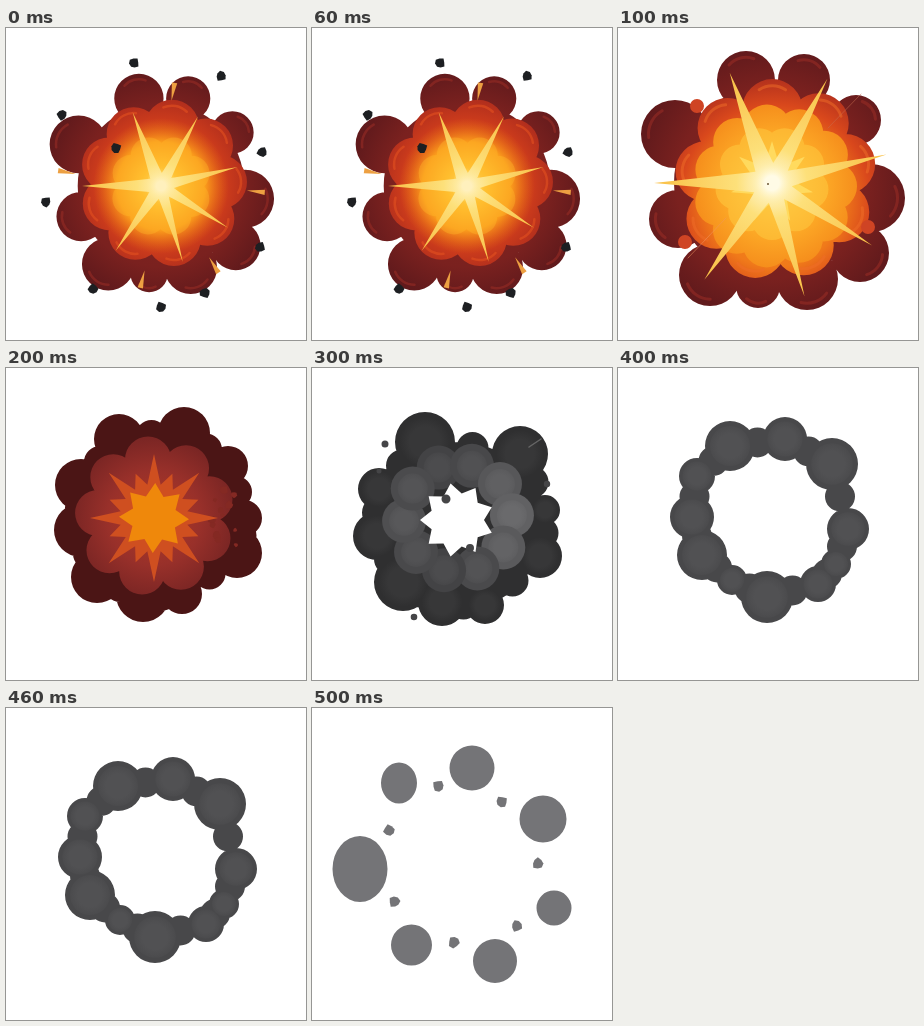
Animation, 300 px wide and 312 px high, one loop 600 ms. Source, as an HTML page with a canvas:

```html
<!DOCTYPE html>
<html lang="en">
<head>
<meta charset="utf-8">
<title>Explosion</title>
<style>
html, body { margin: 0; width: 100%; height: 100%; overflow: hidden; background: #fff; }
canvas { display: block; }
</style>
</head>
<body>
<canvas id="stage" width="300" height="312"></canvas>
<script>
const ctx = document.getElementById('stage').getContext('2d');
const STEP = 100;
const RAD = Math.PI / 180;

const polar = (cx, cy, deg, d) => [cx + d * Math.cos(deg * RAD), cy + d * Math.sin(deg * RAD)];

// Evenly spaced values of an angle, in degrees.
const turns = (n, start) => Array.from({ length: n }, (_, i) => start + i * 360 / n);

// A wreath of n circles around a centre, each as [x, y, r].
const wreath = (cx, cy, n, dist, r, start) => turns(n, start).map(a => [...polar(cx, cy, a, dist), r]);

// Circles halfway between neighbours, pulled towards a centre by a share.
const between = (list, r, pull = 0, cx = 0, cy = 0) => list.map(([x, y], i) => {
  const [u, v] = list[(i + 1) % list.length];
  const mx = (x + u) / 2, my = (y + v) / 2;
  return [mx + (cx - mx) * pull, my + (cy - my) * pull, r];
});

function glow(x, y, r, ...stops) {
  const g = ctx.createRadialGradient(x, y, 0, x, y, r);
  stops.forEach(([at, color]) => g.addColorStop(at, color));
  return g;
}

// Union of round shapes; the vertical radius is optional.
function blobs(fill, list) {
  ctx.beginPath();
  for (const [x, y, rx, ry = rx] of list) {
    ctx.moveTo(x + rx, y);
    ctx.ellipse(x, y, rx, ry, 0, 0, 7);
  }
  ctx.fillStyle = fill;
  ctx.fill();
}

// Each circle shaded by itself, lighter in the middle.
function puffs(light, dark, list) {
  for (const [x, y, r] of list) {
    blobs(glow(x, y, r, [0, light], [0.6, light], [1, dark]), [[x, y, r]]);
  }
}

// Crescent highlights on the side away from the centre.
function rims(color, width, cx, cy, list) {
  ctx.strokeStyle = color;
  ctx.lineWidth = width;
  ctx.lineCap = 'round';
  for (const [x, y, r] of list) {
    const a = Math.atan2(y - cy, x - cx);
    ctx.beginPath();
    ctx.arc(x, y, r * 0.78, a - 0.6, a + 0.6);
    ctx.stroke();
  }
}

function poly(fill, pts) {
  ctx.beginPath();
  pts.forEach(p => ctx.lineTo(...p));
  ctx.closePath();
  ctx.fillStyle = fill;
  ctx.fill();
}

// Star with rays at the given angles; the valleys lie halfway at distance r.
function star(fill, cx, cy, r, angles, reach) {
  poly(fill, angles.flatMap((a, i) => {
    const next = angles[i + 1] ?? angles[0] + 360;
    return [polar(cx, cy, a, reach(i)), polar(cx, cy, (a + next) / 2, r)];
  }));
}

// Small irregular lumps.
function stones(fill, list) {
  for (const [x, y, r] of list) {
    poly(fill, turns(8, x).map((a, k) => polar(x, y, a, r * (1 + 0.15 * Math.sin(k * 2.7 + y)))));
  }
}

// Thin radial wedge.
function spark(fill, cx, cy, deg, from, to) {
  poly(fill, [polar(cx, cy, deg, from), polar(cx, cy, deg - 1, to), polar(cx, cy, deg + 2, to)]);
}

function line(color, width, x1, y1, x2, y2) {
  ctx.strokeStyle = color;
  ctx.lineWidth = width;
  ctx.beginPath();
  ctx.moveTo(x1, y1);
  ctx.lineTo(x2, y2);
  ctx.stroke();
}

// The fireball's cloud around its centre, and the rays of its flash.
const CLOUD = [
  [-26, -103, 29], [32, -103, 26], [84, -63, 25], [99, 15, 34], [88, 70, 29],
  [35, 96, 31], [-14, 103, 22], [-62, 92, 31], [-94, 36, 29], [-97, -49, 34]];
const RAYS = [-180, -111, -62, -14, 32, 74, 125];

function cloud(cx, cy, size) {
  const lobes = CLOUD.map(([x, y, r]) => [cx + x * size, cy + y * size, r * size]);
  blobs(glow(cx, cy, 136 * size, [0, '#84251f'], [0.7, '#7a211f'], [1, '#611a1c']),
    [...lobes, [cx, cy, 98 * size]]);
  rims('rgba(150,44,36,.6)', 3 * size, cx, cy, lobes);
}

function flash(cx, cy, r, reach, core) {
  star(glow(cx, cy, reach, [0, core], [0.3, '#fde07a'], [1, '#f9bf45']), cx, cy, r, RAYS, () => reach);
  blobs(glow(cx, cy, r * 1.2, [0, core], [0.3, core], [1, 'rgba(255,232,140,0)']), [[cx, cy, r * 1.2]]);
}

function ignite() {
  const cx = 155, cy = 158;
  cloud(cx, cy, 0.85);
  const flames = wreath(157, 155, 9, 57, 27, -81);
  blobs(glow(cx, cy, 90, [0, '#f58a18'], [0.5, '#e2601b'], [0.75, '#c93a1c'], [1, '#ad2c1d']),
    [...flames, [cx, cy, 60]]);
  rims('rgba(226,80,32,.6)', 2.5, cx, cy, flames);
  blobs(glow(cx, cy, 68, [0, '#ffe37a'], [0.3, '#ffc030'], [0.65, '#fa9c1c'], [1, 'rgba(226,85,20,0)']),
    [[cx, cy, 68]]);
  blobs('rgba(255,186,45,.35)', wreath(cx, cy, 8, 33, 18, -67));
  flash(cx, cy, 13, 79, '#fff0bd');
  for (const a of [-83, 3, 56, 101, 188]) spark('#eda042', cx, cy, a, 86, 104);
  stones('#1d1f22', [
    [128, 35], [215, 48], [256, 124], [254, 219], [199, 265],
    [155, 279], [87, 261], [40, 174], [56, 87], [110, 120]].map(p => [...p, 5]));
}

function blast() {
  const cx = 154, cy = 155;
  cloud(cx, cy, 1);
  const flames = wreath(158, 152, 9, 71, 30, -93);
  blobs(glow(157, 172, 122, [0, '#f78c18'], [0.55, '#f07a1a'], [0.78, '#d9481c'], [1, '#b2301d']),
    [...flames, [cx, cy, 74]]);
  rims('rgba(240,110,40,.5)', 3, cx, cy, flames);
  blobs(glow(157, 158, 88, [0, '#ffd24a'], [0.6, '#fca625'], [1, '#f4891a']),
    [...wreath(157, 158, 11, 58, 24, -98), [157, 158, 58]]);
  blobs('rgba(255,205,66,.5)', [...wreath(cx, cy, 9, 37, 20, -70), [cx, cy, 36]]);
  line('rgba(200,110,80,.5)', 1, 243, 66, 210, 100);
  line('rgba(240,150,100,.5)', 1, 108, 190, 70, 230);
  star('rgba(255,222,100,.85)', cx, cy, 18, turns(7, -90), () => 42);
  flash(cx, cy, 20, 118, '#fffbe6');
  blobs('#cf4424', [[79, 78, 7], [67, 214, 7], [250, 199, 7]]);
  blobs('#6b5635', [[150, 156, 1]]);
}

function embers() {
  const lobes = [
    [113, 71, 25], [178, 65, 26], [222, 98, 20], [238, 150, 18], [231, 185, 25],
    [176, 226, 20], [137, 227, 27], [91, 209, 26], [75, 162, 27], [75, 117, 26]];
  blobs('#4b1515', [...lobes, ...between(lobes, 16), [150, 150, 76]]);
  blobs(glow(148, 150, 86, [0, '#b23a25'], [0.55, '#98302a'], [1, '#762423']),
    [...wreath(149, 148, 9, 57, 23, -97), [148, 150, 58]]);
  // Torn right edge
  stones('#842923', turns(12, 0).map((a, i) => [218 + 12 * Math.sin(i * i), 122 + i * 5, 4 - i % 3]));
  star('#cf4f20', 148, 150, 34, turns(16, 180), i => i % 2 ? 48 : 64);
  star('#ef880b', 148, 150, 23, turns(8, 182), () => 35);
}

function smoke() {
  const lobes = [
    [113, 74, 30], [208, 86, 28], [233, 142, 15], [228, 188, 22],
    [173, 237, 19], [130, 234, 24], [91, 214, 29], [65, 168, 24], [67, 121, 21]];
  blobs('#2f2f30', [...lobes, ...between(lobes, 16), [147, 158, 84]]);
  puffs('#373738', '#2f2f30', lobes.map(([x, y, r]) => [x, y, r * 0.85]));
  // The inner wreath is palest at the sides, most of all on the right.
  const gray = (a, shift) => {
    const c = Math.cos(a * RAD), v = Math.round(68 + shift + 20 * c * c + 9 * c);
    return `rgb(${v},${v},${v + 2})`;
  };
  for (const a of turns(10, -111)) {
    const [x, y] = polar(146, 150, a, 54);
    blobs(gray(a, 0), [[x, y, 22]]);
    puffs(gray(a, 9), gray(a, 4), [[x, y, 15]]);
  }
  line('#666', 1.5, 217, 79, 229, 71);
  star('#fff', 145, 152, 27, turns(9, 180), () => 37);
  blobs('#454547', [[134, 131, 4.5], [158, 180, 4], [73, 76, 3.5], [235, 116, 3.2], [102, 249, 3.3], [67, 103, 2.5]]);
}

function ring() {
  const lobes = [
    [112, 78, 25], [167, 71, 22], [214, 96, 26], [230, 161, 21], [218, 196, 15], [200, 216, 18],
    [149, 229, 26], [114, 212, 15], [84, 187, 25], [74, 149, 22], [79, 108, 18]];
  blobs('#48484a', [...lobes, ...between(lobes, 15)]);
  puffs('#515153', '#4b4b4d', lobes.map(([x, y, r]) => [x, y, r * 0.8]));
}

function wisps() {
  const lobes = [
    [160, 60, 22.5], [231, 111, 23.5], [242, 200, 17.5], [183, 253, 22],
    [99.5, 237, 20.5], [48, 161, 27.5, 33], [87, 75, 18, 20.5]];
  blobs('#747477', lobes);
  stones('#747477', between(lobes, 5.5, 0.12, 147, 155));
}

const poses = [ignite, blast, embers, smoke, ring, wisps];
let shown = -1;

function tick() {
  const i = Math.floor(performance.now() / STEP) % poses.length;
  if (i !== shown) {
    shown = i;
    ctx.fillStyle = '#fff';
    ctx.fillRect(0, 0, 300, 312);
    poses[i]();
  }
  requestAnimationFrame(tick);
}
tick();
</script>
</body>
</html>
```
